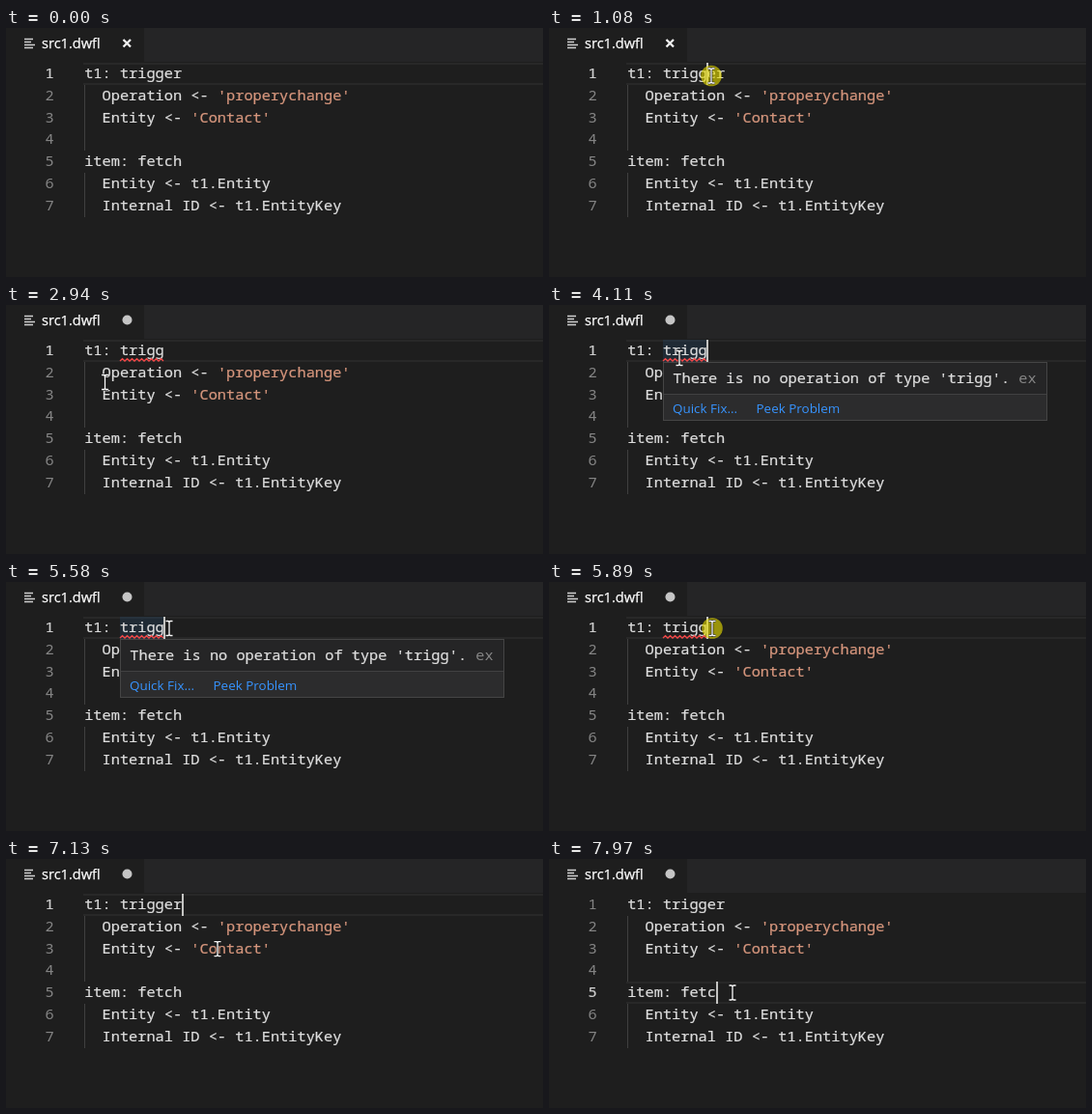
Animation, 556 px wide and 258 px high, one loop 8000 ms. Source, as an HTML page:

```html
<!DOCTYPE html>
<html lang="en">
<head>
<meta charset="utf-8">
<title>Editor</title>
<style>
html, body { margin: 0; width: 100%; height: 100%; overflow: hidden; background: #1e1e1e; }
svg { display: block; width: 556px; height: 258px; }
text { white-space: pre; }
.code { font: 15.3px "Noto Sans Mono", "DejaVu Sans Mono", monospace; fill: #dedede; stroke: #dedede; stroke-width: .22px; }
.ui { font-family: "Open Sans", "Noto Sans", sans-serif; }
.str { fill: #d6967d; stroke: #d6967d; }
.dim { fill: #858585; stroke: none; }
.now { fill: #d0d0d0; stroke: #d0d0d0; }
.match { fill: #0097fb; stroke: none; font-weight: 700; }
.link { font-size: 13.45px; fill: #3794ff; }
</style>
</head>
<body>
<svg viewBox="0 0 556 258">
  <rect width="556" height="258" fill="#1e1e1e"/>
  <rect x="143" width="413" height="35" fill="#252526"/>
  <path d="M19 11.5h9M19 14.5h7M19 17.5h11M19 20.5h9" stroke="#d0d0d0" stroke-width="1.4"/>
  <text class="ui" x="37" y="21" font-size="14.6" fill="#fff" stroke="#fff" stroke-width=".25">src1.dwfl</text>
  <path id="close" d="M121.5 12l7.5 7.5M129 12l-7.5 7.5" stroke="#f0f0f0" stroke-width="2.3"/>
  <circle id="dirty" cx="125.5" cy="15.5" r="5" fill="#c5c5c5"/>

  <g id="lineBox" fill="#282828">
    <rect x="80" width="476" height="2"/>
    <rect x="80" y="21" width="476" height="2"/>
  </g>
  <path d="M81.5 59V127M81.5 150V196" stroke="#404040"/>
  <rect id="word" height="23" fill="#474747"/>
  <rect id="tint" x="118" y="36" width="46" height="23" fill="#264f78" opacity=".25"/>
  <g id="lines"></g>
  <path id="squiggle" fill="none" stroke="#f04848" stroke-width="1.4"/>
  <rect id="caret" width="2" height="23" fill="#c4c4c2"/>

  <g id="tip">
    <rect x="118.5" y="59.5" width="397" height="60" fill="#252526" stroke="#454545"/>
    <rect x="119" y="92" width="396" height="27" fill="#2c2c2d"/>
    <path d="M119 92.5H515" stroke="#414142"/>
    <text class="code" x="128.3" y="81">There is no operation of type 'trigg'. <tspan class="dim">ex</tspan></text>
    <text class="ui link" x="128" y="112">Quick Fix...</text>
    <text class="ui link" x="214.5" y="112">Peek Problem</text>
  </g>

  <g id="list">
    <rect x="163.5" y="59.5" width="400" height="23" fill="#062f4a" stroke="#454545"/>
    <rect x="172.5" y="65.5" width="16" height="12" fill="none" stroke="#c5c5c5" stroke-width="1.2"/>
    <text class="ui" x="174.2" y="74.5" font-size="7.5" fill="#d4d4d4">abc</text>
    <text class="code" x="193.5" y="76"><tspan class="match">trigg</tspan>er</text>
  </g>

  <circle id="ring" r="10.8" fill="#e6dc00" opacity=".62"/>
  <g id="beam" fill="none">
    <path id="bar" d="M-3.5 -7.5h2.5l1 1l1 -1h2.5M0 -6.5V6.5M-3.5 7.5h2.5l1 -1l1 1h2.5" stroke="#111" stroke-width="2.6"/>
    <path id="core" stroke="#fff" stroke-width="1.3"/>
  </g>
  <path id="hand" fill="#fff" stroke="#111" stroke-linejoin="round"
    d="M-2 1Q0 -1.5 2 1V7Q4 6 5 8Q7 7 7.5 9Q9.500 8.500 9.500 11V15Q9.500 18 7 21H-1.500Q-2 19 -4 16.500L-6.500 12.500Q-6 10 -4 11.500L-2 13.500Z"/>
</svg>
<script>
const LOOP = 8000, LEFT = 81.2, CHAR = 9.18, TOP = 36, PITCH = 22.83;
const BLINK = 500, HOLD = 460, RING = 140, HIGHLIGHT_DELAY = 150;

const $ = id => document.getElementById(id);
const rowY = row => Math.round(TOP + row * PITCH);
const show = (el, on) => el.setAttribute("display", on ? "inline" : "none");
const put = (el, x, y) => el.setAttribute("transform", `translate(${x} ${y})`);
const within = (t, from, to) => t >= from && t < to;
const ease = k => k * k * (3 - 2 * k);

const source = [
  "t1: trigger", "  Operation <- 'properychange'", "  Entity <- 'Contact'", "",
  "item: fetch", "  Entity <- t1.Entity", "  Internal ID <- t1.EntityKey"
];

// What the user does; the caret sits after `before` in the given row.
const steps = [
  { at: 1040, row: 0, before: "t1: trigg", click: true },
  { at: 1300, row: 0, before: "t1: trigger", click: true, word: "trigger" },
  { at: 2010, row: 0, before: "t1: trigge", edit: true },
  { at: 2180, row: 0, before: "t1: trigg", edit: true },
  { at: 5760, row: 0, before: "t1: trigg", click: true },
  { at: 6600, row: 0, before: "t1: trigger", click: true, edit: true },
  { at: 7500, row: 4, before: "item: fetch", click: true, word: "fetch" },
  { at: 7970, row: 4, before: "item: fetc", edit: true }
];

const mouseStart = [434, 239];
const moves = [
  { from: 380, to: 620, x: 101, y: 56 },
  { from: 620, to: 760, x: 168, y: 49.5 },
  { from: 1180, to: 1300, x: 231, y: 52 },
  { from: 2790, to: 2930, x: 102.5, y: 80 },
  { from: 2950, to: 3250, x: 135, y: 55 },
  { from: 5150, to: 5560, x: 169, y: 48 },
  { from: 6130, to: 6420, x: 228, y: 79 },
  { from: 6970, to: 7480, x: 190, y: 138.5 }
];

function addText(x, row, anchor, html) {
  const el = document.createElementNS("http://www.w3.org/2000/svg", "text");
  el.setAttribute("class", "code");
  el.setAttribute("x", x);
  el.setAttribute("y", rowY(row) + 16);
  el.setAttribute("text-anchor", anchor);
  el.innerHTML = html;
  $("lines").append(el);
  return el;
}

const markup = line => line.replace("<", "&lt;").replace(/'.*'/, s => `<tspan class="str">${s}</tspan>`);
const numbers = source.map((_, i) => addText(49.8, i, "end", i + 1));
const rows = source.map((line, i) => addText(LEFT, i, "start", markup(line)));

let wave = "M118 58";
for (let x = 120.5, up = true; x < 164; x += 2.5, up = !up) wave += `L${x} ${up ? 55.8 : 58}`;
$("squiggle").setAttribute("d", wave);
$("core").setAttribute("d", $("bar").getAttribute("d"));

function mouseAt(t) {
  let [x, y] = mouseStart;
  for (const m of moves) {
    if (t < m.from) break;
    const k = ease(Math.min(1, (t - m.from) / (m.to - m.from)));
    x += (m.x - x) * k;
    y += (m.y - y) * k;
  }
  return [x, y];
}

function drawText(done, step, t) {
  const edited = done.some(s => s.edit);
  show($("close"), !edited);
  show($("dirty"), edited);

  for (const row of [0, 4]) {
    const edit = done.findLast(s => s.edit && s.row === row);
    rows[row].textContent = edit ? edit.before : source[row];
  }

  const active = step ? step.row : 0;
  put($("lineBox"), 0, rowY(active));
  numbers.forEach((el, i) => el.setAttribute("class", i === active ? "code now" : "code dim"));

  const word = step && step.word;
  show($("word"), word && t >= step.at + HIGHLIGHT_DELAY);
  if (word) {
    put($("word"), LEFT + (step.before.length - word.length) * CHAR, rowY(active));
    $("word").setAttribute("width", word.length * CHAR);
  }

  // Solid just after each action, then blinking on a steady clock.
  const lit = Math.floor((t - 110) / BLINK) % 2 === 0;
  show($("caret"), step && (lit || t < step.at + HOLD));
  if (step) put($("caret"), Math.floor(LEFT + step.before.length * CHAR), rowY(active));
}

function draw(t) {
  const done = steps.filter(s => s.at <= t);
  const step = done[done.length - 1];
  drawText(done, step, t);

  const hint = within(t, 3570, 5720);
  const list = within(t, 5960, 6600);
  show($("squiggle"), within(t, 2330, 6660));
  show($("tint"), hint);
  show($("tip"), hint);
  show($("list"), list);

  const [x, y] = mouseAt(t);
  const visible = within(t, 380, 1860) || t >= 2790;
  const hand = list && y > 59;
  show($("beam"), visible && !hand);
  show($("hand"), visible && hand);
  show($("ring"), step && step.click && t < step.at + RING);
  for (const id of ["beam", "hand", "ring"]) put($(id), x, y);
}

const start = performance.now();
function tick() {
  draw((performance.now() - start) % LOOP);
  requestAnimationFrame(tick);
}
draw(0);
requestAnimationFrame(tick);
</script>
</body>
</html>
```
